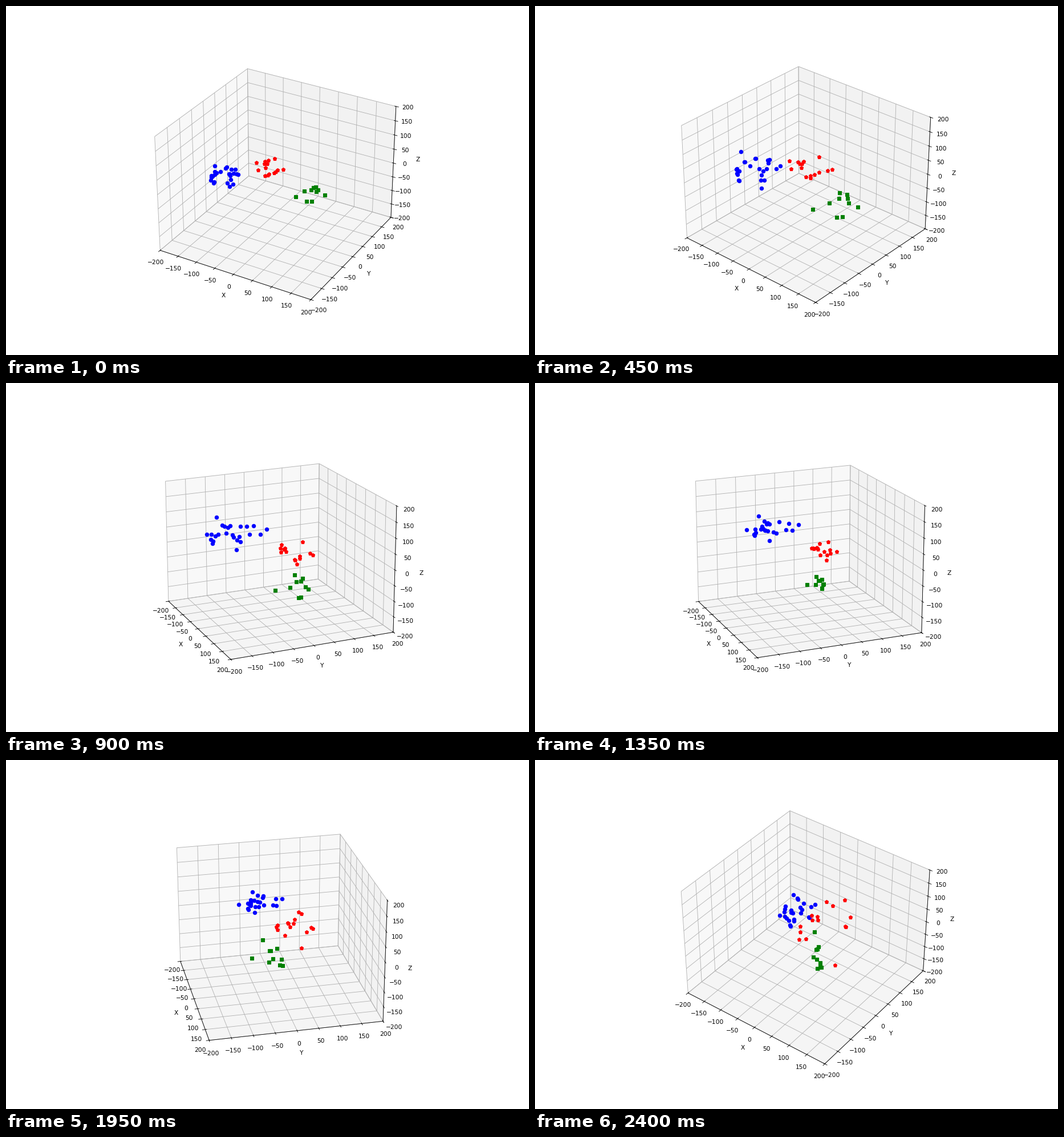
Write a matplotlib script that moves like this. It is 917 px wide and 611 px high and loops after 2.45 s.

```python
import numpy as np
import matplotlib.pyplot as plt
from matplotlib.animation import FuncAnimation

W, H, DPI = 917, 611, 76.4
FRAMES, STEP_MS = 49, 50
DRIFT = 1.2  # radians each flock's arrangement turns through in one loop

# Camera path: time in frames, elevation, azimuth
VIEW = [(0, 30, -60), (9, 30.4, -49), (11, 26.1, -43.5), (18, 18.4, -23.85),
        (22, 17.5, -22.7), (27, 17.5, -22.7), (32.3, 25.4, -12.6),
        (39, 25.4, -12.6), (44, 36.9, -29.5), (48, 38.8, -53.2)]

# Flock paths: time in frames, centre x and y, spread in x and y (pixels)
BLUE = [(0, 381.6, 296.5, 16, 9.5), (9, 384.2, 285.5, 23.7, 14.9),
        (18, 394.2, 263.4, 28, 12.5), (27, 409, 254.8, 21.9, 9),
        (39, 440.5, 250, 18, 8), (48, 456, 266, 16, 14)]
GREEN = [(0, 536, 327.8, 13.5, 8.8), (9, 535, 346.7, 20.4, 14.2),
         (18, 510.5, 356.3, 15.7, 12.5), (27, 497.8, 350.5, 8.3, 6.3),
         (31, 481.5, 352.5, 7.7, 6.4), (39, 466, 343, 15.8, 13.7),
         (48, 495.5, 342.7, 4.2, 19)]
RED = [(0, 460.7, 283.2, 12.2, 9.5), (9, 479.2, 283.8, 21, 11),
       (18, 503, 297, 18, 10.4), (27, 503.5, 292.4, 12.5, 7.8),
       (31, 505, 290.5, 10.5, 6.5), (39, 504, 291, 20, 14.5),
       (48, 505, 286, 31, 28)]


def along(keys, t):
    """Values of a keyed path at time t."""
    times, *columns = np.transpose(keys)
    return np.array([np.interp(t, times, c) for c in columns])


def disc(rng, n):
    """Random points spread evenly over a disc."""
    angle = rng.uniform(0, 2 * np.pi, n)
    radius = np.sqrt(rng.uniform(0, 1, n))
    return np.column_stack((radius * np.cos(angle), radius * np.sin(angle)))


class Flock:
    def __init__(self, axes, style, count, keys, seed):
        rng = np.random.default_rng(seed)
        self.start, self.turn = disc(rng, count), disc(rng, count)
        self.keys = keys
        self.line, = axes.plot([], [], style)

    def move(self, i):
        angle = DRIFT * i / FRAMES
        shape = self.start * np.cos(angle) + self.turn * np.sin(angle)
        shape = (shape - shape.mean(0)) / shape.std(0)
        x, y, wide, high = along(self.keys, i)
        self.line.set_data(x + wide * shape[:, 0], y + high * shape[:, 1])


# The tiny surplus keeps the canvas from rounding down a pixel
fig = plt.figure(figsize=((W + 1e-5) / DPI, (H + 1e-5) / DPI), dpi=DPI)
ax = fig.add_subplot(projection="3d")
ticks = range(-200, 201, 50)
ax.set(xlim=(-200, 200), ylim=(-200, 200), zlim=(-200, 200),
       xticks=ticks, yticks=ticks, zticks=ticks,
       xlabel="X", ylabel="Y", zlabel="Z")

# Flat layer in pixels, on which the flocks move
sky = fig.add_axes((0, 0, 1, 1))
sky.set(xlim=(0, W), ylim=(H, 0))
sky.axis("off")

flocks = [Flock(sky, "bo", 25, BLUE, seed=4),
          Flock(sky, "gs", 10, GREEN, seed=7),
          Flock(sky, "rp", 15, RED, seed=2)]


def draw(i):
    elev, azim = along(VIEW, i)
    ax.view_init(elev=elev, azim=azim)
    for flock in flocks:
        flock.move(i)
    return [flock.line for flock in flocks]


anim = FuncAnimation(fig, draw, frames=FRAMES, interval=STEP_MS, repeat=True)
plt.show()
```
